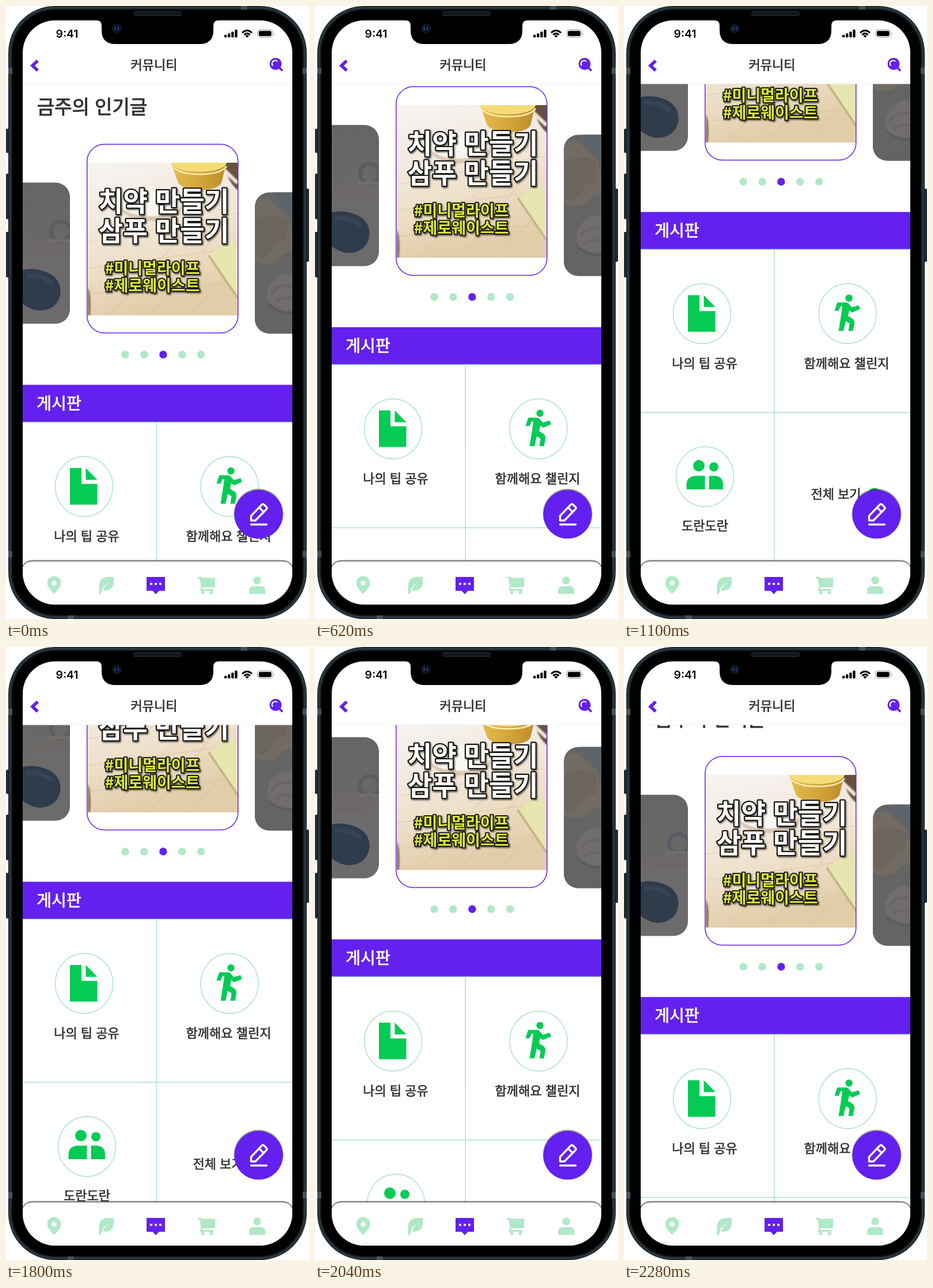
Recreate the animation shown at these times as an HTML page. Size 526 by 1064 pixels, loop 2.4 s.

```html
<!DOCTYPE html>
<html lang="ko">
<head>
<meta charset="utf-8">
<title>커뮤니티</title>
<style>
  html, body { margin: 0; width: 100%; height: 100%; overflow: hidden; background: #fff; }
  svg { display: block; width: 100vw; height: 100vh; }
  /* A hairline stroke gives the regular cut a medium weight */
  .label { font-family: "Noto Sans CJK KR", "Noto Sans CJK", "Noto Sans CJK JP", sans-serif; font-size: 22px; text-anchor: middle; fill: #303030; stroke: #303030; stroke-width: .03em; }
  .heading { font-size: 33px; }
  .bar { font-size: 28px; fill: #fff; stroke: #fff; }
  .clock { font: 600 19.3px Inter, sans-serif; text-anchor: middle; }
  .poster .label { font-weight: 900; paint-order: stroke; stroke: #1d1a18; stroke-linejoin: round; }
  .poster .big { font-size: 46.5px; stroke-width: 4.5px; fill: #fff; }
  .poster .tag { font-size: 27px; stroke-width: 4px; fill: #dbe936; }
  .purple { fill: #6320ee; }
  .mint { fill: #b0e8c8; }
  .green { fill: #05cb55; }
  .thin { fill: none; stroke: #a9e2c4; stroke-width: 1.4; }
</style>
</head>
<body>
<svg viewBox="0 0 526 1064" preserveAspectRatio="none">
  <defs>
    <clipPath id="screen"><rect x="29" y="25" width="468" height="1014" rx="56"/></clipPath>
    <clipPath id="page"><rect x="29" y="135" width="468" height="904"/></clipPath>
    <clipPath id="photo"><rect x="142" y="272" width="260" height="265"/></clipPath>
    <clipPath id="left"><rect x="-80" y="306.500" width="191" height="245" rx="25"/></clipPath>
    <clipPath id="right"><rect x="432" y="323.500" width="191" height="245" rx="25"/></clipPath>
    <linearGradient id="wood" x1="0" y1="0" x2=".25" y2="1">
      <stop offset="0" stop-color="#f6f4f2"/>
      <stop offset=".35" stop-color="#f3ebe1"/>
      <stop offset=".65" stop-color="#eee0ca"/>
      <stop offset="1" stop-color="#e2cda9"/>
    </linearGradient>
    <linearGradient id="bowl">
      <stop offset="0" stop-color="#e4bd50"/>
      <stop offset=".5" stop-color="#d5a63a"/>
      <stop offset="1" stop-color="#bd8b2c"/>
    </linearGradient>
    <linearGradient id="wall" x1="0" y1="0" x2="0" y2="1">
      <stop offset="0" stop-color="#656565"/>
      <stop offset="1" stop-color="#6c6968"/>
    </linearGradient>
    <filter id="soft" x="-20%" y="-20%" width="140%" height="140%"><feGaussianBlur stdDeviation="1.3"/></filter>
    <filter id="drop" x="-10%" y="-20%" width="120%" height="150%">
      <feDropShadow dx="1.5" dy="2" stdDeviation="1.2" flood-color="#000" flood-opacity=".55"/>
    </filter>
  </defs>

  <!-- phone body -->
  <g fill="#222b31">
    <rect y="213" width="8" height="42" rx="2"/>
    <rect y="291" width="8" height="79" rx="2"/>
    <rect y="392" width="8" height="79" rx="2"/>
    <rect x="518" y="317" width="8" height="127" rx="2"/>
  </g>
  <rect x="4" width="518" height="1064" rx="81" fill="#11181c"/>
  <rect x="7" y="3" width="512" height="1058" rx="78" fill="none" stroke="#2a353c" stroke-width="4"/>
  <g fill="#46525a">
    <rect x="4" y="107" width="7" height="11"/><rect x="515" y="107" width="7" height="11"/>
    <rect x="4" y="946" width="7" height="11"/><rect x="515" y="946" width="7" height="11"/>
    <rect x="408" width="11" height="6"/><rect x="107" y="1058" width="11" height="6"/>
  </g>
  <rect x="11" y="7" width="504" height="1050" rx="74"/>
  <rect x="221.500" y="9.500" width="83" height="7" rx="3" fill="#11161a" stroke="#30363a"/>

  <g clip-path="url(#screen)">
    <rect x="29" y="25" width="468" height="1014" fill="#fff"/>

    <g clip-path="url(#page)">
      <g id="scroll">
        <text class="label heading" x="149.500" y="187">금주의 인기글</text>

        <g clip-path="url(#left)">
          <rect x="29" y="306" width="82" height="125" fill="url(#wall)"/>
          <rect x="29" y="430" width="82" height="122" fill="#6c6a6b"/>
          <path d="M29 432L111 429" stroke="#725f5b" stroke-width="2" opacity=".6"/>
          <g filter="url(#soft)">
            <circle cx="95" cy="391" r="17" fill="none" stroke="#565b63" stroke-width="6"/>
            <path d="M111 407H74" stroke="#77716c" stroke-width="4"/>
          </g>
          <path d="M20 462C36 453 57 456 73 463C91 471 99 489 92 508C85 526 63 533 45 526C35 522 28 517 20 508Z" fill="#2e3c4c"/>
          <path d="M35 469Q61 464 81 483" fill="none" stroke="#364557" stroke-width="8" filter="url(#soft)"/>
        </g>

        <g clip-path="url(#right)">
          <rect x="432" y="323" width="66" height="246" fill="#646466"/>
          <path d="M432 443L498 424V569H432Z" fill="#656464"/>
          <path d="M463 323H498V374Z" fill="#5c646b"/>
          <path d="M432 347Q438 329 457 336L490 366L498 400V426L481 430L470 443Q448 452 432 442Z" fill="#716b63"/>
          <path d="M434 370Q461 356 490 370L486 408Q473 400 463 422Q450 444 434 433" fill="#6b655e"/>
          <g filter="url(#soft)">
            <path d="M454 500C455 478 475 461 498 465V529C474 533 452 521 454 500Z" fill="#716d6e"/>
            <path d="M461 500Q471 482 495 486M467 514Q480 503 498 508" fill="none" stroke="#676365" stroke-width="4"/>
            <path d="M456 517Q472 533 498 532" fill="none" stroke="#565557" stroke-width="3"/>
          </g>
        </g>

        <rect x="140.750" y="240" width="262" height="327.500" rx="30" fill="#fff"/>
        <g class="poster" clip-path="url(#photo)">
          <rect x="142" y="272" width="260" height="265" fill="url(#wood)"/>
          <path d="M142 410L402 360M142 455L402 420M142 500L390 480M180 537L350 350M250 537L370 390M320 537L402 440" stroke="#cfb48e" stroke-width="1.500" opacity=".35"/>
          <g filter="url(#soft)">
            <ellipse cx="253" cy="349" rx="53" ry="24" fill="#d8c8b3"/>
            <ellipse cx="251" cy="343" rx="52" ry="22" fill="#faf7f2"/>
            <path d="M378 268H405V322Q382 304 378 268Z" fill="#66513f"/>
            <path d="M362 267Q378 285 402 307" fill="none" stroke="#eee5d8" stroke-width="6"/>
            <path d="M142 488Q149 500 146 537H142Z" fill="#8a735a"/>
          </g>
          <path d="M286 270H383L374 307Q367 319 337 319Q305 319 298 305Z" fill="url(#bowl)"/>
          <path d="M286 270Q290 287 336 288Q380 287 384 270Z" fill="#f4dd79"/>
          <path d="M288 278Q301 292 335 292Q373 292 383 278" fill="none" stroke="#f7e7a5" stroke-width="3"/>
          <path d="M353 431L390 410L402 416V503Z" fill="#e8e6b0"/>
          <path d="M353 431L402 503V510L351 435Z" fill="#c4b785"/>
          <g filter="url(#drop)">
            <text class="label big" x="274" y="356">치약 만들기</text>
            <text class="label big" x="274" y="407">삼푸 만들기</text>
            <text class="label tag" x="254" y="465">#미니멀라이프</text>
            <text class="label tag" x="254" y="494.500">#제로웨이스트</text>
          </g>
        </g>
        <rect x="140.750" y="240" width="262" height="327.500" rx="30" fill="none" stroke="#6320ee" stroke-width="1.500"/>
        <g id="dots"></g>

        <rect class="purple" x="29" y="657.500" width="468" height="64.500"/>
        <text class="label bar" x="92" y="700">게시판</text>
        <path class="thin" d="M29 722.500H497M29 1005.500H497M261 722V1400"/>

        <ellipse class="thin" cx="135.500" cy="834" rx="50" ry="52"/>
        <path class="green" d="M111 802H131V829.500H158.500V865.500H111ZM138.500 802L158.500 822.500H138.500Z"/>
        <text class="label" x="140" y="928">나의 팁 공유</text>

        <ellipse class="thin" cx="388" cy="834" rx="50" ry="52"/>
        <circle class="green" cx="390.500" cy="807" r="6.200"/>
        <path class="green" d="M372 814.500H385Q389 814.500 391 818L395.500 823L407 819.500L410 826L396 832L391 828.500L389 838L397 843Q400.500 846 400 851L397.500 864H389.500L391.500 851L385 847L381 864H372.500L377 836L379 821H376L372.500 829H365.500L369.500 816.500Q370 814.500 372 814.500Z"/>
        <text class="label" x="386.500" y="928">함께해요 챌린지</text>

        <ellipse class="thin" cx="140.500" cy="1117" rx="50" ry="52"/>
        <g class="green">
          <circle cx="130" cy="1098" r="10"/><circle cx="156" cy="1100" r="8"/>
          <path d="M108.500 1139V1131Q108.500 1116 125 1115.500H140.500V1139ZM147.500 1139V1115.500H157Q172 1116 172 1131V1139Z"/>
        </g>
        <text class="label" x="140.500" y="1210">도란도란</text>

        <text class="label" x="368" y="1155">전체 보기</text>
        <circle class="green" cx="434.500" cy="1147" r="10.500"/>
        <path d="M429 1147H440M434.500 1141.500V1152.500" stroke="#fff" stroke-width="2.600"/>
      </g>
    </g>

    <!-- header -->
    <path d="M29 135H497" stroke="#f1f1f3"/>
    <text class="clock" x="106" y="54.500">9:41</text>
    <g id="bars"></g>
    <path d="M410 46.500Q418.500 38.500 427 46.500M413.300 50Q418.500 45.300 423.700 50" fill="none" stroke="#000" stroke-width="3"/>
    <path d="M415.300 51.800Q418.500 49.300 421.700 51.800L418.500 55Z"/>
    <rect x="436.800" y="41.300" width="26" height="13" rx="4" fill="none" stroke="#aaa" stroke-width="1.200"/>
    <rect x="438.800" y="43.300" width="22" height="9" rx="2.300"/>
    <path d="M464.500 45.700Q467 48 464.500 50.300Z" fill="#aaa"/>
    <path d="M55 95L46 103.500L55 112" fill="none" stroke="#6320ee" stroke-width="5.500"/>
    <text class="label" x="257" y="110">커뮤니티</text>
    <circle class="purple" cx="468" cy="100.500" r="10.500"/>
    <path d="M474 106.500L480 112.500" stroke="#6320ee" stroke-width="3.500"/>
    <path d="M463 103.500A5.500 5.500 0 0 1 471 96" fill="none" stroke="#fff" stroke-width="2.300"/>

    <!-- write button -->
    <circle cx="438.500" cy="880.500" r="42" fill="#000" opacity=".6" filter="url(#soft)"/>
    <circle class="purple" cx="438.500" cy="882.300" r="42.300"/>
    <g fill="none" stroke="#fff" stroke-width="3.400" stroke-linejoin="round" stroke-linecap="round">
      <path d="M425.500 893V885L444 865.500Q446 863.500 448 865.500L452 869.500Q454 871.500 452 873.500L433 893ZM439.500 870.500L447.500 878.500"/>
      <path d="M425.500 900H452.500"/>
    </g>

    <!-- tab bar -->
    <path d="M29 1045V972Q34 962.500 47 962.500H479Q492 962.500 497 972V1045Z" opacity=".8" filter="url(#soft)"/>
    <path d="M29 1045V975Q33 964 47 964H479Q493 964 497 975V1045Z" fill="#fff"/>
    <path d="M29 1034.500H497" stroke="#eef4f1"/>
    <g class="mint">
      <path fill-rule="evenodd" d="M83.500 1020.500Q71.500 1009 71.500 1001.500A12 12 0 0 1 95.500 1001.500Q95.500 1009 83.500 1020.500ZM83.500 997.500A4.300 4.300 0 1 0 83.500 1006.100A4.300 4.300 0 1 0 83.500 997.500Z"/>
      <path d="M187 991V1000C187 1011 179 1016 168 1014.500Q171 1006 178 1001Q167 1005 165 1020.500H161.500V1007C161.500 996 168 991 178 991Z"/>
      <path d="M333 991H340V992.500H363V1009H341L340 1012H360V1015H336.500L338.500 1008L336.500 994H333Z"/>
      <circle cx="341.500" cy="1018" r="3"/><circle cx="356.500" cy="1018" r="3"/>
      <circle cx="436" cy="997" r="6.800"/>
      <path d="M422 1020.500V1015Q422 1007 430 1007H442Q450 1007 450 1015V1020.500Z"/>
    </g>
    <path class="purple" d="M244 991H276V1015H265.500L260 1021L254.500 1015H244Z"/>
    <path d="M250 1003H254M258 1003H262M266 1003H270" stroke="#fff" stroke-width="3.500"/>
  </g>

  <path d="M157 24H369V25Q360 25 360 34V42Q360 66 336 66H190Q166 66 166 42V34Q166 25 157 25Z"/>
  <circle cx="192.500" cy="39" r="8.500" fill="#10151d"/>
  <circle cx="192.500" cy="39" r="5" fill="#0b1238"/>
  <path d="M189.500 36.500V41.500" stroke="#275a55" stroke-width="2"/>
  <path d="M195 36.500V41.500" stroke="#313b94" stroke-width="2"/>
</svg>
<script>
  const LOOP = 2400, STEP = 120, JUMP = 50;
  const byId = id => document.getElementById(id);
  const page = byId('scroll');

  byId('dots').innerHTML = [0, 1, 2, 3, 4].map(i =>
    `<circle class="${i === 2 ? 'purple' : 'mint'}" cx="${207 + i * 32.9}" cy="605" r="6.700"/>`).join('');
  byId('bars').innerHTML = [4.5, 7, 10, 13.5].map((h, i) =>
    `<rect x="${379 + i * 6.1}" y="${54.5 - h}" width="4.300" height="${h}" rx="1.300"/>`).join('');

  // Hard 50px jumps down to 300, a pause, then back up
  function offset(t) {
    if (t < 500) return 0;
    if (t < 1100) return JUMP * (1 + Math.floor((t - 500) / STEP));
    if (t < 1800) return 300;
    return 250 - JUMP * Math.floor((t - 1800) / STEP);
  }

  function draw(now) {
    page.setAttribute('transform', `translate(0 ${-offset(now % LOOP)})`);
    requestAnimationFrame(draw);
  }
  draw(performance.now());
</script>
</body>
</html>
```
